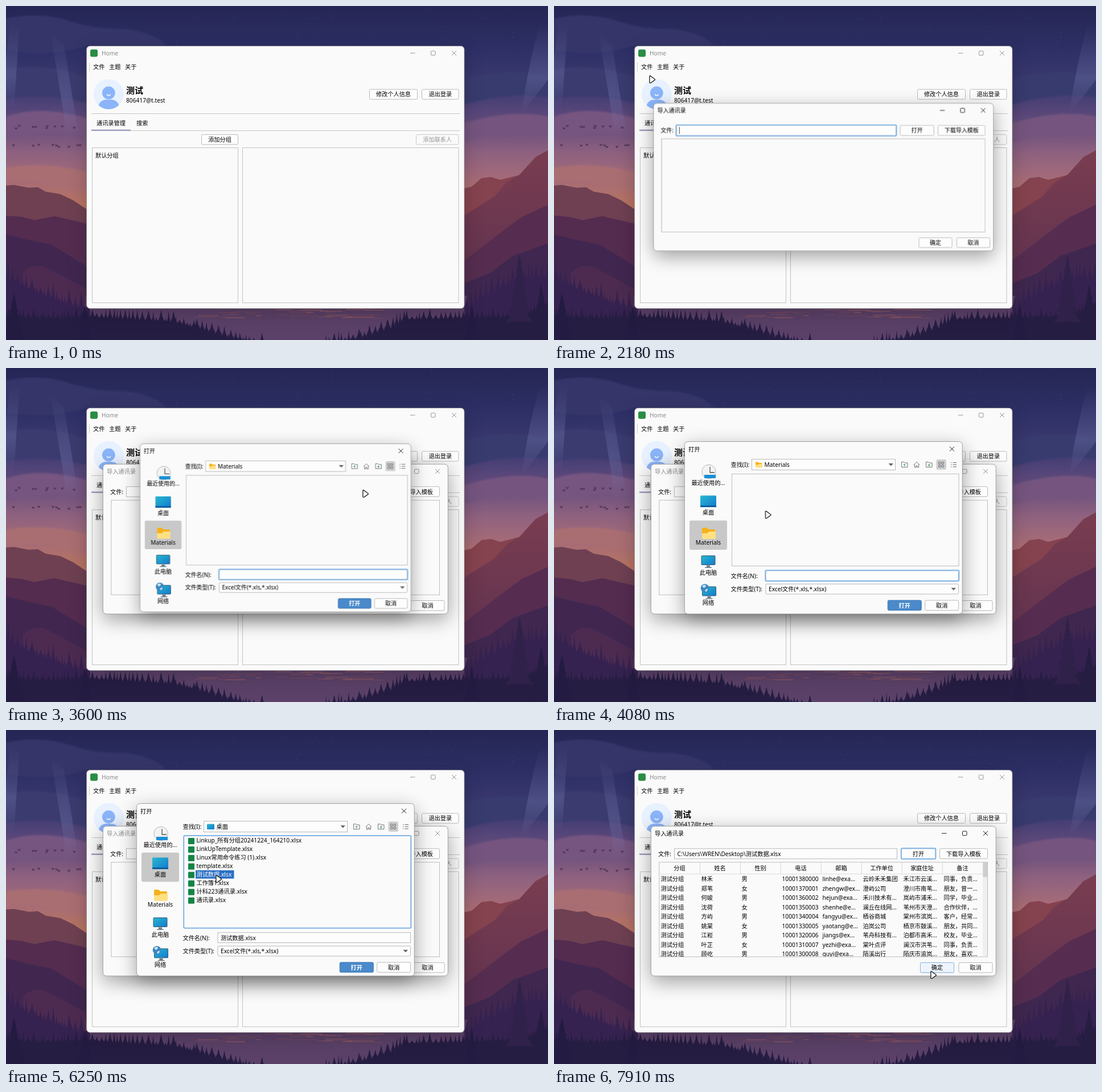
An HTML page that plays this animation: 952 by 588 pixels, repeating every 7.99 s.

```html
<!DOCTYPE html>
<html lang="zh-CN">
<head>
<meta charset="utf-8">
<title>导入通讯录</title>
<style>
html, body { margin: 0; width: 100%; height: 100%; overflow: hidden; background: #252654; }
svg { display: block; width: 952px; height: 588px; }
text { font: 10.2px "Noto Sans", "Noto Sans CJK SC", "Noto Sans CJK JP", sans-serif; white-space: pre; }
</style>
</head>
<body>
<svg id="stage" viewBox="0 0 952 588" xmlns="http://www.w3.org/2000/svg">
  <defs>
    <linearGradient id="sky" x1="0" y1="0" x2="0" y2="370" gradientUnits="userSpaceOnUse">
      <stop offset="0" stop-color="#252654"/><stop offset=".2" stop-color="#2d2f65"/>
      <stop offset=".4" stop-color="#3e3b72"/><stop offset=".55" stop-color="#624b7c"/>
      <stop offset=".7" stop-color="#8e617f"/><stop offset=".82" stop-color="#a46b78"/>
      <stop offset=".95" stop-color="#b87460"/>
    </linearGradient>
    <linearGradient id="slope" x1="0" y1="0" x2="0" y2="1">
      <stop offset="0" stop-color="#7a3d50"/><stop offset="1" stop-color="#552e50"/>
    </linearGradient>
    <linearGradient id="screen" x1="0" y1="0" x2="1" y2="1">
      <stop offset="0" stop-color="#27b9cf"/><stop offset="1" stop-color="#1379cf"/>
    </linearGradient>
    <linearGradient id="beam" x1="0" y1="0" x2="0" y2="1">
      <stop offset="0" stop-color="#7d82b8" stop-opacity="0"/>
      <stop offset=".6" stop-color="#7d82b8" stop-opacity=".3"/>
      <stop offset="1" stop-color="#7d82b8" stop-opacity="0"/>
    </linearGradient>
    <filter id="blur" x="-30%" y="-40%" width="160%" height="180%"><feGaussianBlur stdDeviation="17"/></filter>
    <filter id="soft" x="-30%" y="-60%" width="160%" height="220%"><feGaussianBlur stdDeviation="1.5"/></filter>
    <clipPath id="face"><circle cx="180.3" cy="155.3" r="26.5"/></clipPath>
    <clipPath id="grid"><rect x="185" y="233" width="576" height="166"/></clipPath>
  </defs>
</svg>
<script>
const LOOP = 7990, BLUE = '#82b4e6', EDGE = '#b9b9b9', PAPER = '#fafafa', GREY = '#8a8a8a', INK = '#000';
const stage = document.getElementById('stage');

function make(parent, tag, attrs = {}, content = '') {
  const el = document.createElementNS(stage.namespaceURI, tag);
  for (const key in attrs) el.setAttribute(key, attrs[key]);
  el.textContent = content;
  parent.append(el);
  return el;
}
const group = (parent, attrs) => make(parent, 'g', attrs);
const box = (g, x, y, w, h, fill = 'none', stroke = 'none', rx = 0, width = 1) =>
  make(g, 'rect', { x, y, width: w, height: h, fill, stroke, rx, 'stroke-width': width });
const path = (g, d, fill = 'none', stroke = 'none', width = 1) =>
  make(g, 'path', { d, fill, stroke, 'stroke-width': width });
const disc = (g, cx, cy, r, fill, stroke = 'none') => make(g, 'circle', { cx, cy, r, fill, stroke });
const label = (g, x, y, str, fill = INK, attrs = {}) => make(g, 'text', { x, y, fill, ...attrs }, str);
const centered = (g, x, y, str, fill) => label(g, x, y, str, fill, { 'text-anchor': 'middle' });

// The face lies under the caption, so that hover and focus can go between them
function button(g, x, y, w, h, str, { ink = INK, edge = EDGE, fill = '#fdfdfd', hover } = {}) {
  box(g, x, y, w, h, fill, edge, 2);
  hover?.();
  return centered(g, x + w / 2, y + h / 2 + 3.8, str, ink);
}
const focusRing = (g, x, y, w, h) => box(g, x, y, w, h, 'none', BLUE, 2, 2);

// Motion helpers: every table is a list of [ms, value]
function play(el, prop, table, easing = 'linear') {
  const steps = [[0, table[0][1]], ...table, [LOOP, table.at(-1)[1]]];
  const frames = steps.map(([ms, v]) => ({ offset: ms / LOOP, [prop]: v, easing }));
  el.animate(frames, { duration: LOOP, iterations: Infinity });
}
const toggle = (el, prop, off, on, edges) =>
  play(el, prop, [[0, off], ...edges.map((ms, i) => [ms, i % 2 ? off : on])], 'step-end');
const show = (el, ...edges) => { toggle(el, 'opacity', 0, 1, edges); return el; };
const wake = (el, ...edges) => toggle(el, 'color', GREY, INK, edges);

// Wallpaper
let seed = 7;
const random = () => (seed = seed * 16807 % 2147483647) / 2147483647;
const wall = group(stage);

function treeLine(points, fill, tall) {
  let d = `M${points[0][0]} 588`;
  for (let i = 0; i + 1 < points.length; i++) {
    const [x0, y0] = points[i], [x1, y1] = points[i + 1];
    for (let x = x0; x < x1;) {
      const w = 4 + random() * 8, h = tall * (.25 + .75 * random());
      const y = y0 + (y1 - y0) * (x - x0) / (x1 - x0);
      d += `L${x} ${y}L${x + w * .3} ${y - h * .4}L${x + w / 2} ${y - h}L${x + w * .7} ${y - h * .4}L${x + w} ${y}`;
      x += w;
    }
  }
  path(wall, `${d}L${points.at(-1)[0]} 588Z`, fill);
}
function fir(x, top, height, half, fill) {
  let left = '', right = '';
  for (let i = 1; i <= 7; i++) {
    const y = top + height * i / 7, w = half * i / 7;
    right += `L${x + w} ${y}L${x + w * .6} ${y - 2}`;
    left = `L${x - w * .6} ${y - 2}L${x - w} ${y}` + left;
  }
  path(wall, `M${x} ${top}${right}${left}Z`, fill);
}

box(wall, 0, 0, 952, 588, 'url(#sky)');
const clouds = group(wall, { filter: 'url(#soft)' });
path(clouds, 'M0 22Q60 10 110 26T200 40Q260 45 282 70H140Q80 92 0 78Z', '#343669');
path(clouds, 'M0 112Q70 98 150 128V172Q60 150 0 165Z', '#3b3a70');
path(clouds, 'M0 195Q60 172 150 200V232Q70 215 0 235Z', '#765581');
path(clouds, 'M800 130Q880 105 952 125V160Q880 150 800 175Z', '#373a6e');
path(clouds, 'M800 208Q890 180 952 195V228Q870 220 800 240Z', '#74557f');
path(clouds, 'M0 285Q70 272 150 295V325Q70 305 0 308Z', '#a96e72');
path(wall, 'M8 30H24L14 180H0V90Z', 'url(#beam)');
path(wall, 'M78 45L102 70L128 230H108Z', 'url(#beam)');
path(wall, 'M938 30H952V130L905 190Q918 100 938 30Z', 'url(#beam)');
for (let i = 0; i < 26; i++) disc(wall, 300 + random() * 640, random() * 68, .5, '#4c67a0');
for (let i = 0; i < 18; i++) {
  const x = random() * 136, y = (i % 2 ? 208 : 240) + random() * 6;
  path(wall, `M${x} ${y}l2.5 2l2.5-2l-1 4h-3z`, '#4d3558');
}
path(wall, 'M0 316L14 315L40 320L56 319L70 327L95 331L118 342L145 360V400H0Z', '#6e4052');
path(wall, 'M0 369L26 371L50 377L85 370L145 384V500H0Z', '#542c50');
path(wall, 'M0 402L40 412L80 420L145 460V588H0Z', '#412750');
path(wall, 'M30 470Q50 448 80 465L145 500V588H30Z', '#4d2b51');
path(wall, 'M800 322L818 318L835 303L852 301L868 306L900 298L930 330L800 390Z', '#85434f');
path(wall, 'M952 254L930 266L902 297L880 310L858 335L800 372V588H952Z', 'url(#slope)');
path(wall, 'M952 350L905 372L870 398L800 452V588H952Z', '#562d50');
path(wall, 'M952 418L890 440L850 470L800 490V588H952Z', '#3f274f');
box(wall, 140, 510, 670, 78, '#5b4168');
for (let i = 0; i < 45; i++)
  box(wall, 330 + random() * 300, 531 + random() * 18, 8 + random() * 45, 1, i % 3 ? '#774a63' : '#925a63');
treeLine([[0, 480], [40, 500], [90, 520], [145, 540]], '#362250', 32);
treeLine([[805, 530], [860, 500], [905, 480], [952, 480]], '#362250', 36);
treeLine([[0, 548], [60, 550], [150, 548], [290, 556], [330, 566], [390, 584], [450, 594]], '#261d43', 20);
treeLine([[560, 594], [620, 584], [665, 568], [700, 552], [800, 550], [880, 548], [952, 530]], '#261d43', 20);
fir(14, 505, 83, 20, '#231b41');
fir(138, 528, 60, 14, '#231b41');
fir(818, 525, 63, 14, '#231b41');
fir(902, 438, 120, 24, '#30214a');
fir(940, 490, 98, 22, '#261d43');

// Windows
function frame(g, x, y, w, h, dark = .37) {
  make(g, 'rect', { x, y: y + 10, width: w, height: h, rx: 8, opacity: dark, filter: 'url(#blur)' });
  box(g, x, y, w, h, PAPER, '#8f8f8f', 6, .8);
}
function caption(g, x, y, str, right, middle, full = true) {
  const bar = group(g);
  label(bar, x, y, str, 'currentColor');
  let d = `M${right - 8} ${middle - 4}l8 8m0-8l-8 8`;
  if (full) {
    d += `M${right - 81} ${middle}h8.5`;
    box(bar, right - 44.5, middle - 3.8, 7.5, 7.5, 'none', 'currentColor', 1.2, .9);
  }
  path(bar, d, 'none', 'currentColor', .9);
  return bar;
}

const home = group(stage);
frame(home, 141.5, 70.5, 663.5, 462, .2);
box(home, 148, 76.5, 13, 13, '#2a8d44', 'none', 3);
wake(caption(home, 168, 87, 'Home', 791, 83), 1210, 2060);
path(home, 'M146.5 99v16', 'none', '#cfcfcf');
show(box(home, 150.5, 98, 24.5, 18, '#d5d5d5', 'none', 3), 900, 2060);
['文件', '主题', '关于'].forEach((s, i) => label(home, 153 + 28 * i, 111, s));
disc(home, 180.3, 155.3, 26.5, '#e7f1ff');
const avatar = group(home, { 'clip-path': 'url(#face)' });
disc(avatar, 180.3, 153, 11.4, '#8bb4f9');
box(avatar, 162.5, 165, 36, 34, '#8bb4f9', 'none', 13);
path(avatar, 'M177 155.5q3.3 4.6 6.6 0', 'none', '#fff', 1.4);
label(home, 211, 154, '测试', INK, { style: 'font-size:15px;font-weight:700' });
label(home, 211, 170, '806417@t.test');
button(home, 638.5, 146.8, 84, 17.4, '修改个人信息');
show(focusRing(home, 638, 146.3, 85.5, 18.5), 1210, 2060);
button(home, 730.5, 146.8, 64.5, 17.4, '退出登录');
path(home, 'M150 189.5H797M219 219.5H797', 'none', '#c6c6c6');
show(box(home, 219.5, 193, 39.5, 26, '#f0f0f0'), 570, 2060);
label(home, 159, 210, '通讯录管理');
label(home, 229, 210, '搜索');
box(home, 150, 217.5, 69, 2.5, '#9d9dbd');
button(home, 343.5, 226.3, 64, 17.4, '添加分组');
button(home, 720.5, 226.3, 74.5, 17.4, '添加联系人', { ink: '#929292', edge: '#c9c9c9', fill: PAPER });
box(home, 151.5, 249.5, 256, 273, PAPER, '#c2c2c2');
box(home, 415.5, 249.5, 379.5, 273, PAPER, '#c2c2c2');
label(home, 157, 267, '默认分组');

const menu = show(group(stage), 1330, 2060);
box(menu, 150.5, 117.5, 89, 44, '#fcfcfc', '#c8c8c8', 3);
show(box(menu, 152, 119, 86, 20, '#dcdcdc', 'none', 3), 1610);
label(menu, 160, 132.5, '导入通讯录');
label(menu, 160, 153.5, '导出通讯录');

// Import dialog
const importer = group(stage, { style: 'transform-origin:473px 301px' });
frame(importer, 170.3, 169.3, 606, 263.7);
wake(caption(importer, 177, 186, '导入通讯录', 762, 182), 0, 3520, 6940);
label(importer, 183, 221.5, '文件:');
box(importer, 211.5, 208.8, 391, 18, '#fdfdfd', EDGE);
const entry = show(group(importer), 0, 3150);
focusRing(entry, 210.4, 207.9, 393, 19.6);
show(path(entry, 'M216.4 211.5v12.5', 'none', '#333'), 0, 2670);
show(label(importer, 216.5, 221.5, 'C:\\Users\\WREN\\Desktop\\测试数据.xlsx'), 6940);
button(importer, 610, 208.8, 60, 18, '打开', {
  hover() {
    show(box(importer, 610, 208.8, 60, 18, '#e4e4e4', EDGE, 2), 3110, 3520);
    show(focusRing(importer, 609.8, 208.2, 60.6, 18.8), 3150, 3520, 6940);
  }
});
button(importer, 677.5, 208.8, 84, 17.8, '下载导入模板');
box(importer, 184.8, 232.8, 576.7, 166.5, PAPER, '#bdbdbd');
button(importer, 643.5, 409.5, 59, 17.5, '确定', {
  hover() { show(box(importer, 643.5, 409.5, 59, 17.5, '#eef4fb', BLUE, 2), 7870); }
});
button(importer, 711, 409.5, 59, 17.5, '取消');

const heads = ['分组', '姓名', '性别', '电话', '邮箱', '工作单位', '家庭住址', '备注'];
const people = [
  '林禾|男|linhe@exa...|云岭禾禾集团|禾江市云溪...|同事，负责...',
  '郑苇|女|zhengw@ex...|澄屿公司|澄川市南苇...|朋友，曾一...',
  '何峻|男|hejun@exa...|禾川技术有...|岚屿市浦禾...|同学，毕业...',
  '沈荷|女|shenhe@e...|澜丘在线网...|苇州市天澄...|合作伙伴，...',
  '方屿|男|fangyu@ex...|栖谷商城|棠州市滨岚...|客户，经常...',
  '姚棠|女|yaotang@e...|泊岚公司|栖京市鼓溪...|朋友，共同...',
  '江崧|男|jiangs@ex...|苇舟科技有...|泊都市高禾...|校友，毕业...',
  '叶芷|女|yezhi@exa...|棠叶点评|澜汉市洪苇...|同事，负责...',
  '顾屹|男|guyi@exa...|陌溪出行|陌庆市渝岚...|朋友，喜欢...'
];
const table = show(group(importer, { 'clip-path': 'url(#grid)' }), 6940);
path(table, 'M185 253.5H753', 'none', '#dcdcdc');
heads.forEach((s, i) => {
  centered(table, 220.5 + 71 * i, 247, s);
  path(table, `M${256.3 + 71 * i} 233v20`, 'none', '#d6d6d6');
});
people.forEach((row, r) => {
  const [name, sex, ...rest] = row.split('|');
  const phone = `1000${138 - r}000${r}`;
  ['测试分组', name, sex, phone, ...rest].forEach((s, c) =>
    label(table, 187.5 + 71 * c, 266 + 16.55 * r, s));
});
box(table, 753, 233, 9, 167, '#efefef');
box(table, 753.5, 233, 8, 26, '#cecece');

// File dialog
const picker = group(stage, { style: 'transform-origin:473px 281px' });
frame(picker, 229.3, 129.5, 488, 303.5);
caption(picker, 236, 146.5, '打开', 703, 142.5, false).style.color = INK;
label(picker, 310.5, 174, '查找(I):');
label(picker, 310.5, 369.5, '文件名(N):');
label(picker, 310.5, 393, '文件类型(T):');
box(picker, 347.5, 160.5, 252, 19, '#fdfdfd', EDGE);
box(picker, 372, 380.3, 338.5, 17.7, '#fdfdfd', EDGE, 2);
path(picker, 'M587.5 168h8.5l-4.2 4.5zM697.5 387h8.5l-4.2 4.5z', '#666');
label(picker, 377, 393, 'Excel文件(*.xls,*.xlsx)');

function folder(g, x, y, k = 1) {
  const f = group(g, { transform: `translate(${x} ${y}) scale(${k})` });
  path(f, 'M0 2Q0 0 2 0H8L11 3H21Q23 3 23 5V14H0Z', '#f5b21c');
  path(f, 'M0 10H9L12 7H24V18Q24 20 22 20H2Q0 20 0 18Z', '#ffe083');
}
const inFolder = show(group(picker), 0, 4680);
const inDesktop = show(group(picker), 4680);
folder(inFolder, 354, 165.5, .5);
label(inFolder, 369.5, 174, 'Materials');
box(inDesktop, 353, 165.5, 13, 9.5, 'url(#screen)', 'none', 1);
label(inDesktop, 369.5, 174, '桌面');

box(picker, 671.5, 161, 17.5, 18, '#cfcfcf', 'none', 3);
for (const x of [610.5, 653.5]) path(picker, `M${x} 165.5h4l1.5 1.5h5v7.5h-10.5z`, 'none', '#666', .9);
path(picker, 'M615.7 173v-4m-2 2l2-2l2 2M656.5 171h4.5m-2.2-2.2v4.5', 'none', '#3c9a54', 1);
path(picker, 'M632 170.5l5-5l5 5m-8.5-1v5.5h2.5v-3h2v3h2.5v-5.5', 'none', '#666', .9);
for (const x of [675.5, 681]) for (const y of [165.5, 171]) box(picker, x, y, 3.5, 3.5, 'none', '#666', .5, .9);
path(picker, 'M697 166.5h1.5m2 0h6.5m-10 3.7h1.5m2 0h6.5m-10 3.7h1.5m2 0h6.5', 'none', '#666');

box(inFolder, 238, 268.5, 66, 51.5, '#c8c8c8', 'none', 3);
show(box(inFolder, 238, 215.7, 66, 51.5, '#e4e4e4', 'none', 3), 4320);
box(inDesktop, 238, 215.7, 66, 51.5, '#c8c8c8', 'none', 3);
['最近使用的...', '桌面', 'Materials', '此电脑', '网络'].forEach((s, i) =>
  centered(picker, 271, 205.5 + 52.9 * i, s));
disc(picker, 272, 182.5, 12.3, '#f3f3f3', '#b5b5b5');
path(picker, 'M274 174v10h8', 'none', '#555', 1.3);
path(picker, 'M264 188h20v6h-20z', '#1b8fd6');
box(picker, 257, 224.5, 28, 20.5, 'url(#screen)', 'none', 1.5);
box(picker, 257, 242, 28, 3, '#0d5f9e');
folder(picker, 260, 281);
function monitor(x, y) {
  box(picker, x, y, 24, 16, 'url(#screen)', '#39596c', 1);
  path(picker, `M${x + 9} ${y + 17}h6v3h3v1.5h-12v-1.5h3z`, '#6d7f8a');
}
monitor(259, 330.5);
monitor(260.5, 385);
disc(picker, 265, 387.5, 7.3, '#3d86c2');
path(picker, 'M260 384q4-4 7-1q-1 4-4 4zM265 392q2-4 5-3q0 3-3 5z', '#c8e3ef');

box(picker, 312.5, 186.5, 398.5, 162, PAPER, '#bdbdbd');
const picked = show(group(picker), 6170);
box(picked, 333, 247, 67.5, 14.6, '#2a70c4');
focusRing(picked, 312.2, 186, 399.2, 162.7);
const files = ['Linkup_所有分组20241224_164210', 'LinkUpTemplate', 'Linux常用命令练习 (1)', 'template',
  '测试数据', '工作簿1', '计科223通讯录', '通讯录'];
const list = show(group(picker), 4680);
files.forEach((s, i) => {
  box(list, 320, 190 + 14.95 * i, 11, 11, '#158446', 'none', 1);
  const name = label(list, 334.5, 198.4 + 14.95 * i, s + '.xlsx');
  if (i === 4) toggle(name, 'fill', INK, '#fff', [6170]);
});

box(picker, 372, 356.7, 338.5, 17.7, '#fdfdfd', EDGE);
const nameEntry = show(group(picker), 0, 6170);
focusRing(nameEntry, 371.3, 356.3, 340, 18.6);
show(path(nameEntry, 'M377.5 360v11.5', 'none', '#333'), 3640, 4040, 4440, 4960, 5490, 5970);
show(label(picker, 377, 369.5, '测试数据.xlsx'), 6170);
button(picker, 586.3, 409, 59, 17.6, '打开', { ink: '#fff', edge: '#3a76b5', fill: '#4a8aca' }).style.fontWeight = 700;
button(picker, 651.7, 409, 59, 17.6, '取消');

play(importer, 'opacity', [[2059, 0], [2060, .3], [2140, 1]]);
play(importer, 'transform', [[2060, .93], [2140, .975], [2180, .985], [2220, .992], [2300, 1]]
  .map(([ms, k]) => [ms, `scale(${k})`]));
play(picker, 'opacity', [[3519, 0], [3520, .3], [3600, 1], [6450, 1], [6570, 0]]);
play(picker, 'transform', [[3520, .93], [3600, .975], [3640, .985], [3760, 1], [6450, 1], [6570, .94]]
  .map(([ms, k]) => [ms, `scale(${k})`]));

// Pointer
const pointer = show(group(stage), 330);
path(pointer, 'M.9 1.8Q1 .2 2.4 1.2L9.8 6.6Q11 7.8 9.6 8.6L3.2 13.2Q1 14.2 .9 12.4Z', '#fff', INK, 1.2);
play(pointer, 'transform', [
  [330, 484, 547], [370, 437, 491], [410, 388, 439], [450, 339, 388], [490, 314, 343], [530, 288, 279],
  [610, 238, 208], [690, 212, 172], [850, 176, 118], [930, 165, 112], [1090, 160, 108],
  [1530, 160, 108], [1810, 167, 122],
  [2550, 167, 122], [2710, 308, 141], [2830, 457, 159], [2970, 598, 184], [3050, 618, 193], [3150, 626, 214],
  [3760, 626, 214], [3820, 610, 224], [3890, 594, 232], [3960, 565, 241], [4000, 480, 250],
  [4040, 394, 250], [4080, 371, 251], [4240, 300, 246], [4440, 279, 240],
  [5010, 279, 240], [5400, 335, 246], [5770, 367, 253], [5970, 368, 255],
  [7350, 368, 255], [7470, 378, 261], [7690, 520, 340], [7830, 622, 400], [7910, 661, 424]
].map(([ms, x, y]) => [ms, `translate(${x}px,${y}px)`]));
</script>
</body>
</html>
```
